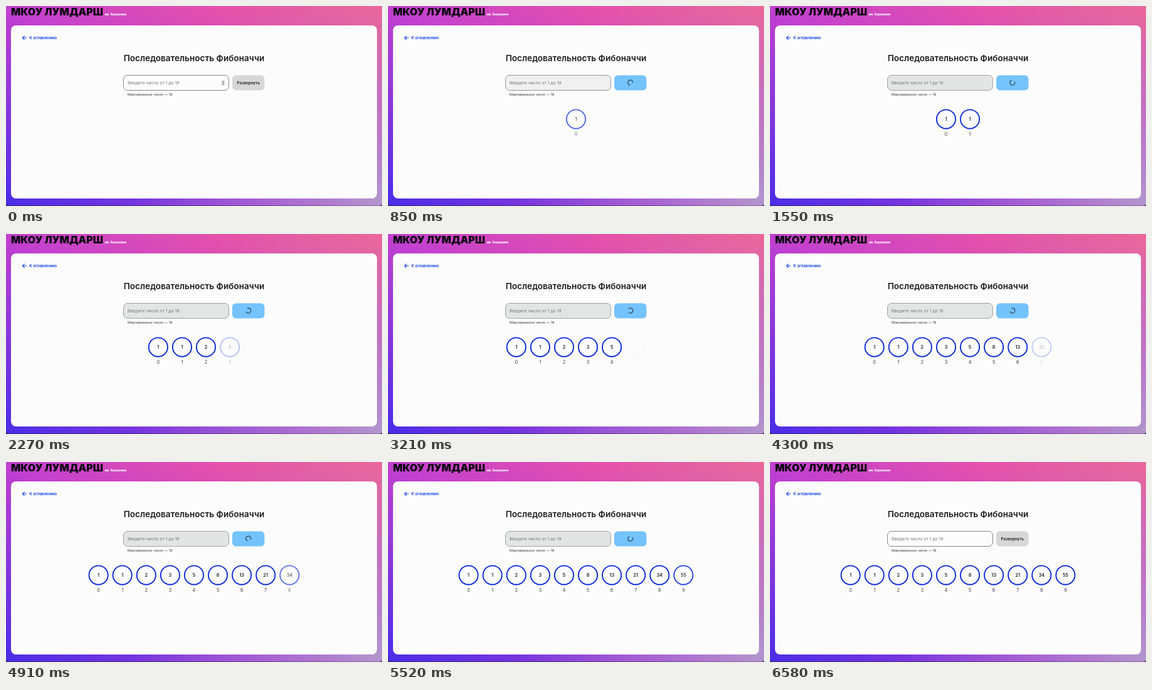
An HTML page with a canvas that plays this animation: 600x319 px, repeating every 6610 ms.

```html
<!DOCTYPE html>
<html lang="ru">
<head>
<meta charset="utf-8">
<title>Последовательность Фибоначчи</title>
<style>
  html, body { margin: 0; width: 100%; height: 100%; overflow: hidden; }
  canvas { display: block; width: 600px; height: 319px; }
</style>
</head>
<body>
<canvas id="stage"></canvas>
<script>
const W = 600, H = 319;
const LOOP = 6610;
const TYPED = 240;          // the value enters the field
const START = 645;          // the button goes into loading
const STEP = 510;           // delay between two numbers
const COUNT = 10;
const END = START + COUNT * STEP;
const FADE = 500;

const canvas = document.getElementById('stage');
const dpr = window.devicePixelRatio || 1;
canvas.width = W * dpr;
canvas.height = H * dpr;
const ctx = canvas.getContext('2d');
ctx.scale(dpr, dpr);

const clamp = v => Math.min(1, Math.max(0, v));
const ramp = (t, from, len) => clamp((t - from) / len);

// cubic-bezier(.25, .1, .25, 1)
function ease(x) {
  if (x <= 0 || x >= 1) return clamp(x);
  const curve = (u, a, b) => 3 * a * u * (1 - u) ** 2 + 3 * b * u * u * (1 - u) + u ** 3;
  let lo = 0, hi = 1;
  for (let i = 0; i < 24; i++) {
    const mid = (lo + hi) / 2;
    if (curve(mid, .25, .25) < x) lo = mid; else hi = mid;
  }
  return curve(lo, .1, 1);
}

function mix(a, b, k) {
  return `rgb(${a.map((v, i) => Math.round(v + (b[i] - v) * k)).join()})`;
}

function text(str, x, y, size, weight, color, align = 'left') {
  ctx.font = `${weight} ${size}px Inter, "Open Sans", sans-serif`;
  ctx.textAlign = align;
  ctx.fillStyle = color;
  ctx.fillText(str, x, y);
}

function box(x, y, w, h, r, fill, stroke) {
  ctx.beginPath();
  ctx.roundRect(x, y, w, h, r);
  ctx.fillStyle = fill;
  ctx.fill();
  if (stroke) {
    ctx.strokeStyle = stroke;
    ctx.lineWidth = 1;
    ctx.stroke();
  }
}

function triangle(x, y, dir) {
  ctx.beginPath();
  ctx.moveTo(x - 1.5, y);
  ctx.lineTo(x + 1.5, y);
  ctx.lineTo(x, y + 2 * dir);
  ctx.fill();
}

function drawBackdrop() {
  ctx.fillStyle = '#1a1622';
  ctx.fillRect(0, 0, W, H);

  // diagonal running corner to corner, with equal colour on the other two
  const k = W * H / (W * W + H * H);
  const dx = H * k, dy = W * k;
  const base = ctx.createLinearGradient(W / 2 - dx, H / 2 + dy, W / 2 + dx, H / 2 - dy);
  base.addColorStop(0, '#4a2de8');
  base.addColorStop(.5, '#c340d0');
  base.addColorStop(1, '#ff5f8c');
  const shape = [0, 0, W, H - .5, [0, 0, 4, 4]];
  box(...shape, base);

  const glow = ctx.createRadialGradient(W, H, 0, W, H, 400);
  glow.addColorStop(0, 'rgba(178,150,204,1)');
  glow.addColorStop(.35, 'rgba(172,140,206,.62)');
  glow.addColorStop(1, 'rgba(160,130,206,0)');
  box(...shape, glow);

  box(8, 31, 584, 276, 8, '#fcfcfc');
}

function drawHeader() {
  text('МКОУ ЛУМДАРШ', 8, 15.3, 16, 900, '#0b0710');
  text('им. Корвалини', 157.5, 15, 4.5, 800, '#fff');

  const blue = '#0a3be6';
  ctx.strokeStyle = blue;
  ctx.lineWidth = 1.1;
  ctx.beginPath();
  ctx.moveTo(33, 50.7);
  ctx.lineTo(26.5, 50.7);
  ctx.moveTo(29.6, 47.6);
  ctx.lineTo(26.5, 50.7);
  ctx.lineTo(29.6, 53.8);
  ctx.stroke();
  text('К оглавлению', 37.3, 53, 6.25, 600, blue);

  text('Последовательность Фибоначчи', 300, 88.3, 13.6, 600, '#1c1c1f', 'center');
}

function drawInput(t) {
  const off = ramp(t, START, 400) - ramp(t, END, 400);
  box(187.5, 110.5, 168, 24, 6.5, mix([252, 252, 252], [226, 229, 227], off),
    mix([135, 135, 138], [160, 162, 161], off));

  if (t >= TYPED && t < START) text('9', 194, 125.4, 6.85, 400, '#222');
  else text('Введите число от 1 до 19', 194, 125.4, 6.85, 400, '#77787a');

  if (t < START) {
    box(343, 118, 7, 9.4, 1.5, '#e9e9e9');
    ctx.fillStyle = '#444';
    triangle(346.5, 121.8, -1);
    triangle(346.5, 123.8, 1);
  }
  text('Максимальное число — 19', 194, 143.2, 5.43, 400, '#333338');
}

function drawButton(t) {
  const loading = t >= START && t < END;
  const on = ramp(t, TYPED, 200) - ramp(t, END, 200);
  box(361, 110.4, 51.5, 24, 6, mix([215, 215, 215], [116, 195, 253], on));
  if (!loading) {
    text('Развернуть', 386.8, 124.7, 6.3, 600, '#1f1f22', 'center');
    return;
  }
  // three quarters of a ring, one turn per second
  const gap = Math.PI / 4 + (t - 850) / 1000 * 2 * Math.PI;
  ctx.beginPath();
  ctx.arc(386.8, 122.2, 4, gap + Math.PI / 4, gap + Math.PI * 7 / 4);
  ctx.strokeStyle = '#27364a';
  ctx.lineWidth = 1.2;
  ctx.stroke();
}

function drawNumbers(t) {
  if (t < START) return;
  const shown = Math.min(COUNT, Math.floor((t - START) / STEP) + 1);
  let cur = 1, next = 1;
  for (let i = 0; i < shown; i++) {
    const x = 300 + (i - (shown - 1) / 2) * 38.1;
    ctx.globalAlpha = ease(ramp(t, START + i * STEP, FADE));
    ctx.beginPath();
    ctx.arc(x, 180.4, 15.1, 0, 2 * Math.PI);
    ctx.strokeStyle = '#0424dc';
    ctx.lineWidth = 1.8;
    ctx.stroke();
    text(cur, x, 183, 7.2, 600, '#1f1f22', 'center');
    text(i, x, 206.6, 7.4, 400, '#3c3c40', 'center');
    [cur, next] = [next, cur + next];
  }
  ctx.globalAlpha = 1;
}

function draw(t) {
  drawBackdrop();
  drawHeader();
  drawInput(t);
  drawButton(t);
  drawNumbers(t);
}

const begin = performance.now();
function tick() {
  draw((performance.now() - begin) % LOOP);
  requestAnimationFrame(tick);
}
tick();
</script>
</body>
</html>
```
